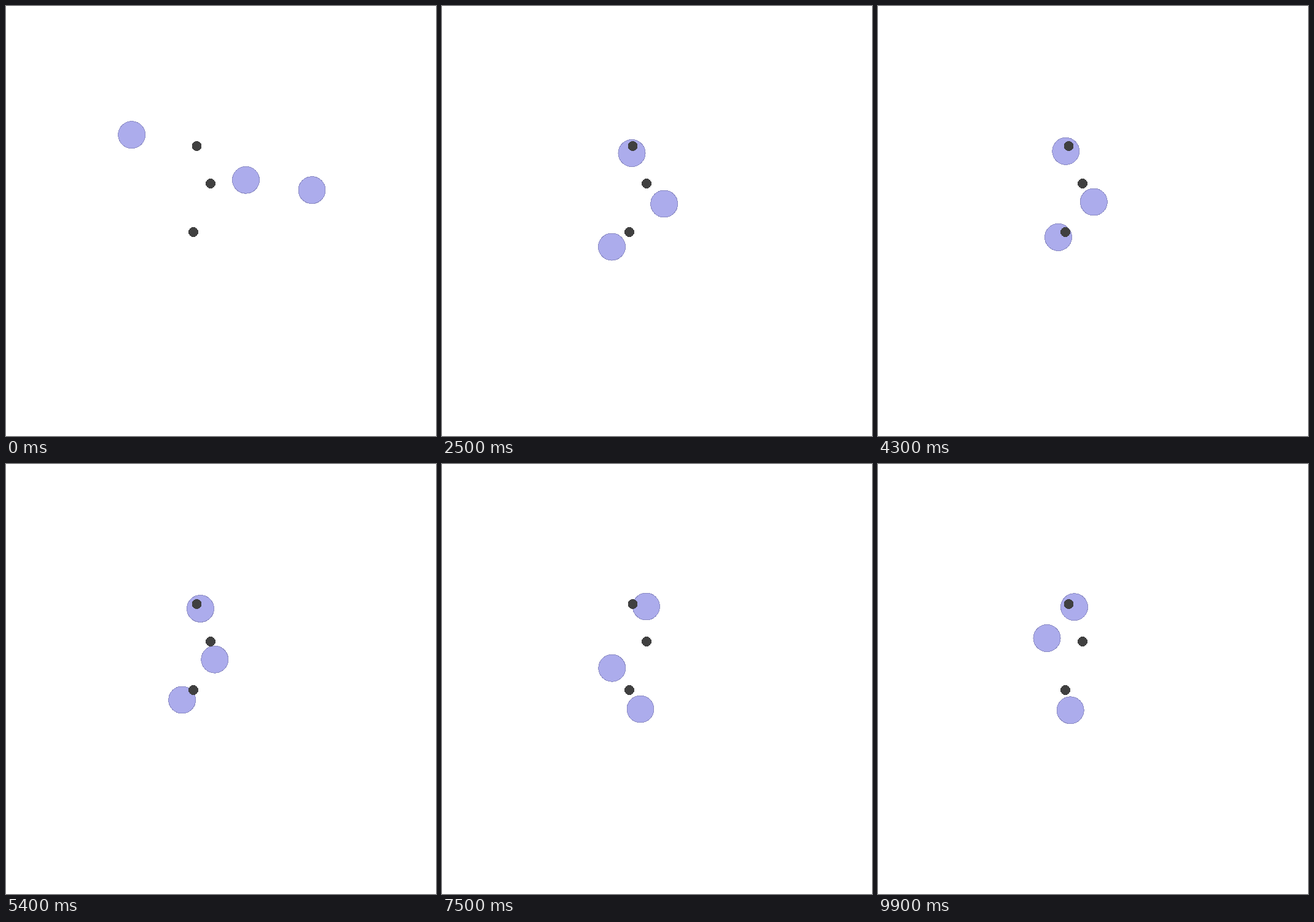
Animation of 700 by 700 pixels, one loop 10 s. Source, as an HTML page:

```html
<!DOCTYPE html>
<html lang="en">
<head>
<meta charset="utf-8">
<title>Agents and landmarks</title>
<style>
  html, body { margin: 0; width: 100%; height: 100%; overflow: hidden; background: #fff; }
  svg { display: block; width: 100%; height: 100%; shape-rendering: crispEdges; }
  .agent { fill: #acacec; stroke: #8c8cc4; stroke-width: 1; }
  .landmark { fill: #404040; }
</style>
</head>
<body>
<svg id="stage" viewBox="0 0 700 700"></svg>
<script>
const STEP = 100, STEPS = 100;
const landmarks = [[310.5, 228], [333, 289], [305, 368]];

// Each agent visits its stops at these steps and drifts to one side in between
const times = [0, 14, 25, 43, 54, 75, 99];
const agents = [
  { drift: [0, -12],
    stops: [[204.7, 209.7], [280.2, 261], [309, 239.5], [305.8, 236.3], [316.5, 235.5], [332.4, 232], [319.5, 232.8]] },
  { drift: [-12, 4],
    stops: [[390.5, 283.2], [277.5, 371], [276.5, 392], [293.5, 376.4], [286.7, 384], [323, 399], [313.2, 400.8]] },
  { drift: [8, 0],
    stops: [[498, 299.7], [363.2, 299.7], [361.7, 322], [351.3, 319], [339.8, 318.2], [276.8, 332.2], [275, 283.5]] }
];

const stage = document.getElementById("stage");

function addCircle(className, r) {
  const circle = document.createElementNS("http://www.w3.org/2000/svg", "circle");
  circle.setAttribute("class", className);
  circle.setAttribute("r", r);
  return stage.appendChild(circle);
}

function place(circle, x, y) {
  circle.setAttribute("cx", x);
  circle.setAttribute("cy", y);
}

// Agents rest at both ends of their path
function slope(stops, i, axis) {
  if (i === 0 || i === times.length - 1) return 0;
  return (stops[i + 1][axis] - stops[i - 1][axis]) / (times[i + 1] - times[i - 1]);
}

// Cubic Hermite curve between stops, plus the sideways drift after the first approach
function coordinate({ stops, drift }, step, axis) {
  const to = Math.max(1, times.findIndex(time => time >= step)), from = to - 1;
  const span = times[to] - times[from];
  const u = (step - times[from]) / span, v = 1 - u;
  const curve = v * v * (1 + 2 * u) * stops[from][axis] + u * u * (3 - 2 * u) * stops[to][axis]
    + span * u * v * (v * slope(stops, from, axis) - u * slope(stops, to, axis));
  return from ? curve + drift[axis] * Math.sin(Math.PI * u) : curve;
}

for (const agent of agents) agent.circle = addCircle("agent", 22);
for (const [x, y] of landmarks) place(addCircle("landmark", 8), x, y);

function render(time) {
  const step = Math.floor(time / STEP) % STEPS;
  for (const agent of agents)
    place(agent.circle, coordinate(agent, step, 0), coordinate(agent, step, 1));
}

const start = performance.now();
function tick() {
  render(performance.now() - start);
  requestAnimationFrame(tick);
}
tick();
</script>
</body>
</html>
```
